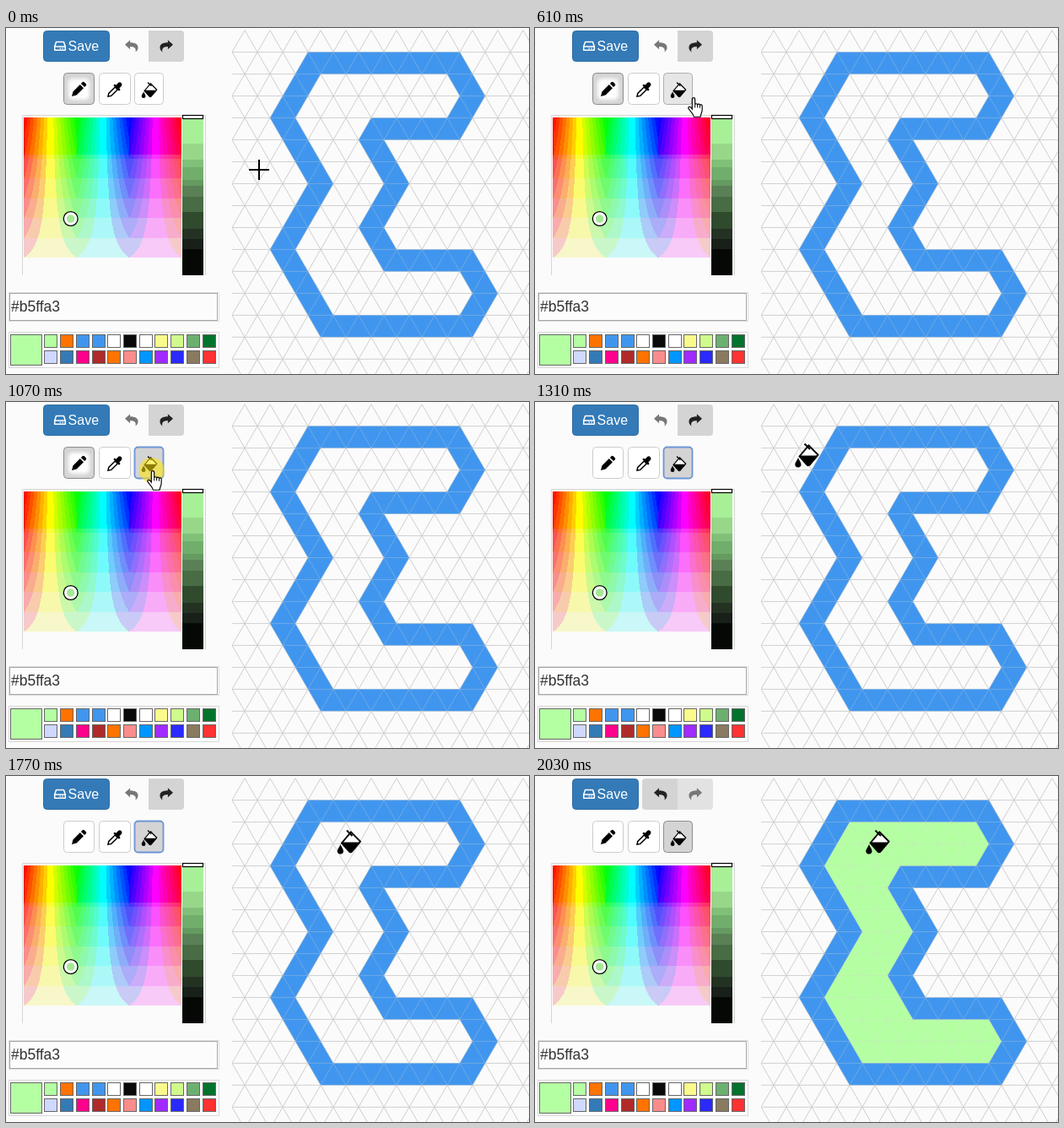
An HTML page with a canvas that plays this animation: 620x410 px, repeating every 2.49 s.

```html
<!DOCTYPE html>
<html lang="en">
<head>
<meta charset="utf-8">
<title>Triangle grid editor</title>
<style>
  html, body { margin: 0; width: 100%; height: 100%; overflow: hidden; background: #fbfbfb; }
  #stage { position: relative; width: 620px; height: 410px; overflow: hidden; }
  svg, canvas { position: absolute; left: 0; top: 0; display: block; }
  text { font-family: "Liberation Sans", Arial, sans-serif; }
</style>
</head>
<body>
<div id="stage">
<canvas id="picker" width="620" height="410"></canvas>
<svg width="620" height="410" viewBox="0 0 620 410">
  <defs>
    <clipPath id="board"><rect x="268" y="2.6" width="352" height="408"/></clipPath>
    <filter id="soft" x="-30%" y="-30%" width="160%" height="160%"><feGaussianBlur stdDeviation="2"/></filter>
    <g id="reply"><path d="M0 6 6.3 0V3.3C12.5 3.4 16 5.2 16 9.8 16 12.3 14.6 14.3 12.9 15.4 13.9 11.8 12.8 8.4 6.3 8.3V12Z"/></g>
    <g id="bucket">
      <path d="M4 18C2.2 22 .3 23.8 .3 26a3.6 3.4 0 0 0 7.2 0C7.5 23.8 5.8 22 4 18Z"/>
      <path d="M16.5 3.5 27.5 14.5 17.5 26.5Q16 28 14.5 26.5L5.5 16.5Z" fill="#fff" stroke="#000" stroke-width="1.9"/>
      <path d="M5 15.5H28L17.5 27Q16 28.4 14.5 27Z"/>
      <path d="M11.5 1.5 18 8" fill="none" stroke="#000" stroke-width="2"/>
    </g>
  </defs>

  <g id="grid" clip-path="url(#board)" fill="none" stroke="#d2d2d2"><path/></g>
  <path id="fill" fill="#b5ffa3"/>
  <path id="outline" fill="#4096ee" fill-rule="evenodd"/>
  <use href="#grid" opacity=".3"/>

  <rect x="44.5" y="3.5" width="78" height="36" rx="4" fill="#337ab7" stroke="#2e6da4"/>
  <path d="M59.5 16.5H68.5L70.3 22V26.3H57.7V22ZM57.7 22H70.3" fill="none" stroke="#fff" stroke-width="1.5" stroke-linejoin="round"/>
  <path d="M63.5 24.2H65M66.3 24.2H67.8" stroke="#fff" stroke-width="1.3"/>
  <text x="73.6" y="27.4" font-size="16" fill="#fff">Save</text>

  <path id="undoBox" d="M169 3H131a4 4 0 0 0-4 4V36a4 4 0 0 0 4 4H169Z"/>
  <path id="redoBox" d="M169 3H207a4 4 0 0 1 4 4V36a4 4 0 0 1-4 4H169Z"/>
  <use id="undo" href="#reply" transform="translate(141 14.3) scale(.97 .92)"/>
  <use id="redo" href="#reply" transform="translate(198 14.3) scale(-.97 .92)"/>

  <g id="tools"></g>
  <rect x="74" y="60" width="25" height="25" rx="5" fill="#fff" filter="url(#soft)"/>
  <path d="M78 81 79.4 75.4 87.8 67 92 71.2 83.6 79.6ZM88.9 65.9 90.7 64.1Q91.7 63.3 92.7 64.1L94.9 66.3Q95.7 67.3 94.9 68.3L93.1 70.1Z"/>
  <path d="M121 81 121.8 77.5 129.3 70 132.3 73 124.8 80.4Z" fill="#fff" stroke="#000" stroke-width="1.5"/>
  <path d="M127.3 68 129 66.4 130.4 67.7 132.8 65.2Q134.8 63.4 136.8 65.2 138.3 67.2 136.7 69L134.3 71.5 135.7 73 134 74.7Z"/>
  <use href="#bucket" transform="translate(160.5 63.5) scale(.66)"/>

  <path d="M19.5 293V103.5H236.5V293" fill="none" stroke="#d6d6d6"/>
  <g id="shades"></g>
  <rect x="209.5" y="103.5" width="24" height="4" fill="#fff" stroke="#000" stroke-width="1.2"/>
  <circle cx="76.7" cy="226" r="8.4" fill="#fff" stroke="#000" stroke-width="1.3"/>
  <circle cx="76.7" cy="226" r="4.8" fill="#a6e898"/>

  <rect x="3.5" y="313.5" width="249" height="34" fill="#fff" stroke="#ddd"/>
  <rect x="4.5" y="314.5" width="246" height="32" fill="#fcfcfc" stroke="#a5a5a5"/>
  <text x="6" y="336.2" font-size="17.5" fill="#333">#b5ffa3</text>
  <rect x="3.5" y="360.5" width="249" height="42" fill="#fcfcfc" stroke="#d8d8d8"/>
  <g id="swatches" stroke="#666"></g>

  <circle id="click" r="15" fill="#ffe600" opacity=".55"/>
  <g id="cursors">
    <g id="cross"><path d="M-12 0H12M0-12V12" stroke="#000" stroke-width="2"/></g>
    <g id="arrow"><path d="M.5 .5V16L4.2 12.6 6.8 18.6 9.2 17.5 6.6 11.7H11.6Z" fill="#fff" stroke="#000"/></g>
    <g id="hand">
      <g transform="scale(1.06 1.08)">
        <path d="M5 13V2.2a1.6 1.6 0 0 1 3.2 0V8a1.5 1.5 0 0 1 2.8.4 1.4 1.4 0 0 1 2.7.6 1.3 1.3 0 0 1 2.5.6V14C16.2 17 14.5 18 14.3 21.5H7C6.6 18.5 3.8 16.5 1.2 12.8-.2 11 2.2 9.6 3.6 11.2Z" fill="#fff" stroke="#000" stroke-width="1.1"/>
        <path d="M8.2 8V11.5M11 8.6V11.5M13.7 9.2V11.8" stroke="#000" stroke-width=".9"/>
      </g>
    </g>
    <g id="pour"><use href="#bucket"/></g>
  </g>
</svg>
</div>
<script>
const LOOP = 2490;
const PAGE = '#fbfbfb';
const SIDE = 30, ROW = SIDE * Math.sqrt(3) / 2, LEFT = 268, TOP = 28.6;
const $ = id => document.getElementById(id);

function add(parent, tag, attrs) {
  const el = document.createElementNS('http://www.w3.org/2000/svg', tag);
  for (const key in attrs) el.setAttribute(key, attrs[key]);
  return parent.appendChild(el);
}
function paint(el, fill, stroke) {
  el.setAttribute('fill', fill);
  if (stroke) el.setAttribute('stroke', stroke);
}
const show = (el, on) => { el.style.display = on ? '' : 'none'; };

function drawGrid() {
  let d = '';
  for (let y = TOP; y < 410; y += ROW) d += `M${LEFT} ${y}H620`;
  const rise = 16 * ROW, run = 8 * SIDE;
  for (let x = LEFT - 9 * SIDE; x < 900; x += SIDE) {
    d += `M${x - 15} ${TOP - ROW}l${run} ${rise}M${x + 15} ${TOP - ROW}l${-run} ${rise}`;
  }
  $('grid').firstElementChild.setAttribute('d', d);
}

// Corners are given as half sides across and rows down the grid.
function polygon(corners) {
  const points = corners.split(' ').map(corner => {
    const [col, row] = corner.split(',');
    return `${LEFT + col * SIDE / 2} ${TOP + row * ROW}`;
  });
  return `M${points.join('L')}Z`;
}
function drawShape() {
  const inner = polygon('7,1 17,1 18,2 17,3 11,3 10,4 12,6 10,8 12,10 18,10 19,11 18,12 8,12 5,9 8,6 5,3');
  const outer = polygon('6,0 18,0 20,2 18,4 12,4 14,6 12,8 13,9 19,9 21,11 19,13 7,13 3,9 6,6 3,3');
  $('fill').setAttribute('d', inner);
  $('outline').setAttribute('d', outer + inner);
}

// Hue runs across and saturation falls downwards, in coarse colour levels.
function drawPicker() {
  const ctx = $('picker').getContext('2d');
  const level = v => v > .885 ? 1 : Math.max(0, .82 - .125 * Math.floor((.885 - v) / .125));
  for (let x = 0; x < 187; x++) {
    for (let y = 0; y < 187; y++) {
      const sat = 1 - y / 187, hue = x / 187 * 6;
      const pale = level(1 - sat);
      const rgb = [5, 3, 1].map(n => {
        const k = (n + hue) % 6;
        const drop = Math.max(0, Math.min(k, 4 - k, 1));
        const value = drop === 1 && sat > .77 ? 0 : level(1 - sat * drop);
        return value * (255 - 10 * pale);
      });
      ctx.fillStyle = pale === 1 ? PAGE : `rgb(${rgb})`;
      ctx.fillRect(21 + x, 106 + y, 1, 1);
    }
  }
}

function drawShades() {
  const bands = [[106, '#a8f098'], [137, '#98d78a'], [156, '#80c078'], [165, '#71ae6c'], [180, '#659a60'],
    [187, '#5a8055'], [200, '#486c44'], [218, '#304a2d'], [238, '#243224'], [250, '#182019'], [262, '#050805']];
  bands.forEach(([y, fill], i) => {
    const end = i + 1 < bands.length ? bands[i + 1][0] : 293;
    add($('shades'), 'rect', { x: 209, y, width: 25, height: end - y, fill });
  });
}

function drawSwatches() {
  const rows = [
    '#b5ffa3 #ff7300 #4096ee #4096ee #ffffff #0a0a0a #ffffff #fafa8c #d0fa8c #6cb070 #00732d',
    '#cfd8ff #337ab7 #ff008c #b02a2a #ff7300 #fa8c8c #0096ff #a02aff #2a2aff #8a7a60 #ff3232'
  ];
  add($('swatches'), 'rect', { x: 5.5, y: 363.5, width: 37, height: 36, fill: '#b5ffa3' });
  rows.forEach((row, r) => row.split(' ').forEach((fill, c) => {
    add($('swatches'), 'rect', { x: Math.round(45.35 + c * 18.72) + .5, y: 363.5 + r * 19, width: 15, height: 15, fill });
  }));
}

const [pencilBox, , bucketBox] = [[68, 36], [110, 37], [152, 34]].map(([x, width]) =>
  add($('tools'), 'rect', { x: x + .5, y: 53.5, width, height: 37, rx: 4, fill: '#fff', stroke: '#ccc' }));

// Start time, cursor, x, y
const path = [
  [0, 'cross', 300, 168], [70, 'cross', 286, 160], [150, 'arrow', 260, 141], [230, 'arrow', 240, 122],
  [300, 'arrow', 226, 109], [380, 'arrow', 214, 100], [460, 'arrow', 206, 91], [530, 'arrow', 199, 84],
  [610, 'hand', 181, 82], [690, 'hand', 172, 81], [760, 'hand', 167, 81], [1080, 'hand', 177, 81],
  [1160, 'arrow', 210, 84], [1240, 'pour', 283, 52], [1310, 'pour', 308, 48], [1390, 'pour', 338, 48],
  [1470, 'pour', 360, 51], [1550, 'pour', 376, 56], [1630, 'pour', 386, 60], [1700, 'pour', 391, 63],
  [1770, 'pour', 392.5, 63], [1860, 'pour', 392, 63]
];

function render(t) {
  const [, kind, x, y] = path.findLast(step => step[0] <= t);
  for (const cursor of $('cursors').children) show(cursor, cursor.id === kind);
  $(kind).setAttribute('transform', `translate(${x} ${y})`);

  const pressed = t >= 920 && t < 1080, filled = t >= 1860;
  show($('click'), pressed || (filled && t < 2030));
  $('click').setAttribute('transform', filled ? 'translate(393 100)' : 'translate(173 81)');
  show($('fill'), filled);

  const on = ['#d4d4d4', '#8c8c8c'], off = ['#fff', '#ccc'];
  paint(pencilBox, ...(t < 1080 ? on : off));
  paint(bucketBox, ...(filled ? on : t >= 920 ? ['#d4d4d4', '#6d95d8'] : t >= 610 ? ['#e6e6e6', '#adadad'] : off));
  bucketBox.setAttribute('stroke-width', t >= 920 && !filled ? 1.8 : 1);

  paint($('undoBox'), filled ? '#d4d4d4' : PAGE);
  paint($('redoBox'), filled ? '#e2e2e2' : '#d4d4d4');
  paint($('undo'), filled ? '#222' : '#777');
  paint($('redo'), filled ? '#777' : '#222');
}

drawGrid();
drawShape();
drawPicker();
drawShades();
drawSwatches();
const start = performance.now();
function tick() {
  render((performance.now() - start) % LOOP);
  requestAnimationFrame(tick);
}
tick();
</script>
</body>
</html>
```
